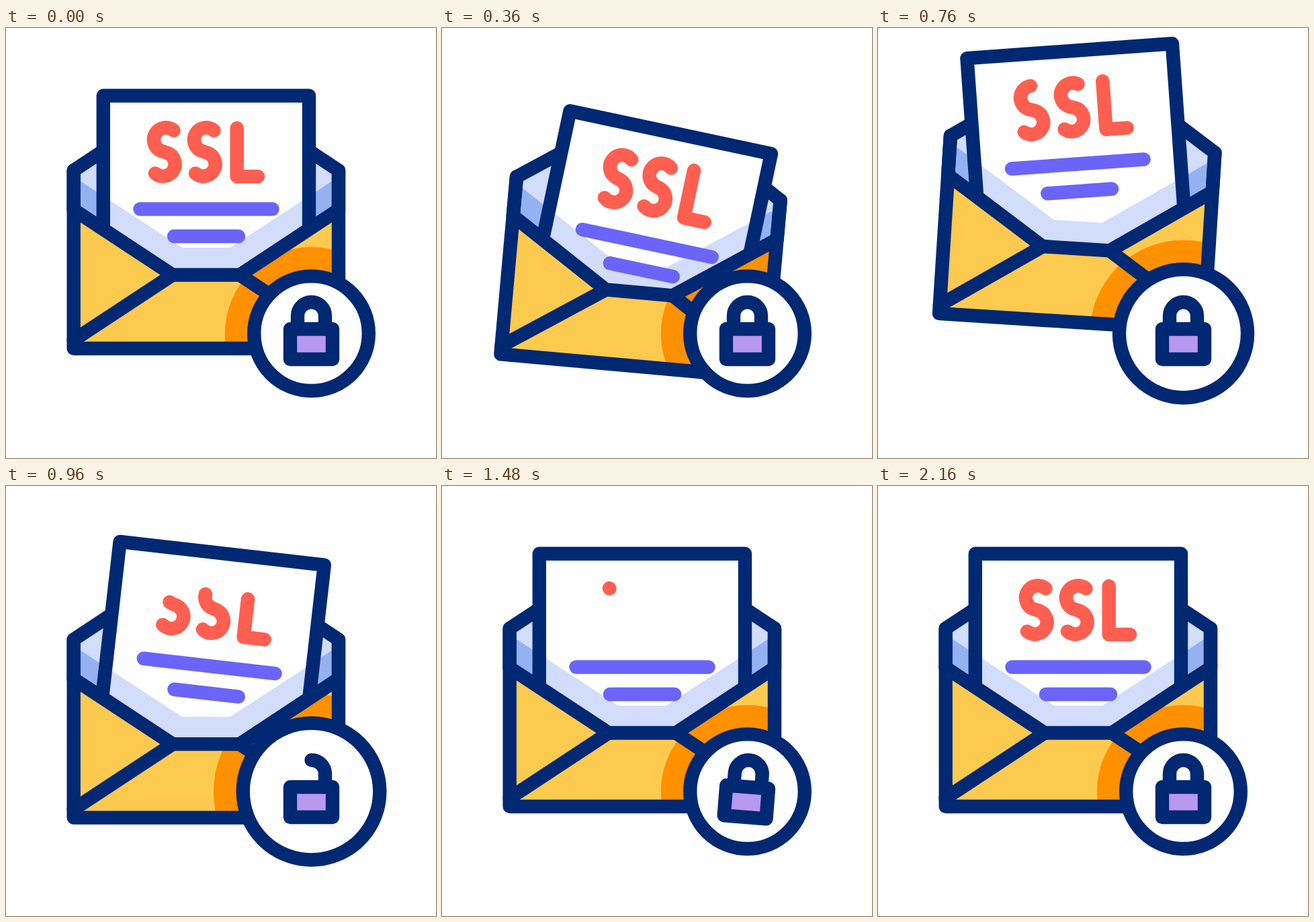
Recreate the animation shown at these times as an HTML page without scripts. Size 640 px wide and 640 px high, loop 2200 ms.

```html
<!DOCTYPE html>
<html lang="en">
<head>
<meta charset="utf-8">
<title>Secure mail</title>
<style>
  html, body { margin: 0; width: 100%; height: 100%; overflow: hidden; background: #fff; }
  svg { display: block; width: 100vw; height: 100vh; }

  :root { --sine: cubic-bezier(.37, 0, .63, 1); }
  svg * { transform-box: view-box; }

  .line { fill: none; stroke: #002873; stroke-width: 20.4; stroke-linecap: round; stroke-linejoin: round; }
  .bar { stroke: #6a65f8; stroke-width: 20.5; stroke-linecap: round; }
  .glyph {
    fill: none; stroke: #ff5f50; stroke-width: 20.5;
    stroke-linecap: round; stroke-linejoin: round; stroke-dasharray: 100 200;
  }

  .env, .letter, .lock, .badge, .glow, .glyph, .shackle {
    animation: 2200ms var(--sine) infinite;
  }
  .env { transform-origin: 298px 319px; animation-name: env-y, env-turn; }
  .letter { transform-origin: 298px 311px; animation-name: letter-y, letter-turn; }
  .lock { transform-origin: 454.5px 450px; animation-name: shake; }
  .badge { animation-name: badge; }
  .glow { animation-name: glow; }
  .shackle { stroke-dasharray: 100 200; animation-name: unlock; }
  .s1 { animation-name: write-s1; }
  .s2 { animation-name: write-s2; }
  .l { animation-name: write-l; }

  @keyframes env-y {
    0%, 66.36%, 100% { translate: 0 0; }
    18.18% { translate: 0 27.2px; }
    32.73% { translate: 0 -43px; }
    44.09% { translate: 0 16.8px; }
    53.64% { translate: 0 -26px; }
  }
  @keyframes env-turn {
    0% { rotate: 0deg; animation-timing-function: cubic-bezier(.42, 0, .85, .85); }
    20.91% { rotate: 7.3deg; }
    25.45% { rotate: 5.4deg; animation-timing-function: linear; }
    34.55% { rotate: 3.65deg; }
    43.64% { rotate: 0deg; }
    51.82% { rotate: 1.8deg; }
    62.73%, 100% { rotate: 0deg; }
  }
  /* the letter moves inside the envelope */
  @keyframes letter-y {
    0%, 66.36%, 100% { translate: 0 0; }
    16.36% { translate: 0 23.5px; }
    32.73%, 39.09% { translate: 0 -28px; }
    53.64% { translate: 0 14.5px; }
  }
  @keyframes letter-turn {
    0%, 58.18%, 100% { rotate: 0deg; }
    16.36% { rotate: 6.9deg; }
    32.73%, 34.55% { rotate: -7.75deg; }
    43.64% { rotate: 6.5deg; }
  }
  @keyframes badge {
    0%, 27.27%, 60.91%, 100% { r: 85.3px; }
    40%, 50.91% { r: 101.8px; }
  }
  @keyframes glow {
    0%, 27.27%, 60.91%, 100% { r: 128.7px; }
    40%, 50.91% { r: 145.6px; }
  }
  @keyframes unlock {
    0%, 35.45%, 55.45%, 100% { stroke-dashoffset: 0; }
    42.73%, 49.09% { stroke-dashoffset: -50; }
  }
  @keyframes shake {
    0%, 53.64%, 98.18%, 100% { rotate: 0deg; }
    58.64% { rotate: -6.6deg; }
    66.14% { rotate: 5deg; }
    74.09% { rotate: -3.2deg; }
    81.82% { rotate: 2deg; }
    90% { rotate: -1deg; }
  }
  /* erase from the start of the stroke, then draw it again */
  @keyframes write-s1 {
    0%, 27.27% { stroke-dashoffset: 0; animation-timing-function: ease-in; }
    54.55% { stroke-dashoffset: -102; }
    54.56%, 65.27% { stroke-dashoffset: 102; }
    85.27%, 100% { stroke-dashoffset: 0; }
  }
  @keyframes write-s2 {
    0%, 31.36% { stroke-dashoffset: 0; animation-timing-function: ease-in; }
    57.73% { stroke-dashoffset: -102; }
    57.74%, 67.05% { stroke-dashoffset: 102; }
    87.05%, 100% { stroke-dashoffset: 0; }
  }
  @keyframes write-l {
    0%, 35.45% { stroke-dashoffset: 0; animation-timing-function: ease-in; }
    61.36% { stroke-dashoffset: -102; }
    61.37%, 68.82% { stroke-dashoffset: 102; }
    88.82%, 100% { stroke-dashoffset: 0; }
  }
</style>
</head>
<body>
<svg viewBox="0 0 640 640" role="img" aria-label="SSL letter in an envelope with a padlock">
  <defs>
    <clipPath id="paper"><path class="letter" d="M145 415V101H451V415Z"/></clipPath>
    <clipPath id="front"><path class="env" d="M100.7 270.5L248 367.5H348L495 270.5V477H100.7Z"/></clipPath>
    <path id="shade" d="M101 221.5L262 327H334L495 221.5V270L348 367H248L101 270Z"/>
  </defs>

  <g class="env">
    <!-- back of the envelope -->
    <path fill="#d2dcfb" d="M101 212L190 153H406L495 212V270L348 367H248L101 270Z"/>
    <use href="#shade" fill="#94b2f2"/>
    <path class="line" d="M100.7 270V212L190 153H406L495 212V270"/>

    <!-- letter -->
    <path class="letter" fill="#fff" d="M145 415V101H451V415Z"/>
    <g clip-path="url(#paper)"><use href="#shade" fill="#d2dcfb"/></g>
    <g class="letter">
      <path class="line" d="M144.8 415V100.8H451V415"/>
      <path class="bar" d="M199.5 269.5H396.5"/>
      <path class="bar" d="M250 310H346"/>
      <path class="glyph s1" pathLength="100" d="M249.5 152.6A18 18 0 1 0 231 183L240.5 186A18 18 0 1 1 222 216.4"/>
      <path class="glyph s2" pathLength="100" d="M309.5 152.6A18 18 0 1 0 291 183L300.5 186A18 18 0 1 1 282 216.4"/>
      <path class="glyph l" pathLength="100" d="M343.7 149V221H375"/>
    </g>

    <path fill="#fdca50" d="M100.7 270.5L248 367.5H348L495 270.5V477H100.7Z"/>
  </g>

  <!-- the glow stays with the badge, seen only on the front -->
  <g clip-path="url(#front)">
    <circle class="glow" cx="454.5" cy="454.7" r="128.7" fill="#ff9000"/>
  </g>
  <g class="env">
    <path class="line" d="M100.7 212V477H495V212"/>
    <path class="line" d="M100.7 270.5L248 367.5H348L495 270.5"/>
    <path class="line" d="M248 367.5L100.7 464.5M348 367.5L495 464.5"/>
  </g>

  <!-- padlock badge -->
  <circle class="badge" cx="454.5" cy="454.7" r="85.3" fill="#fff" stroke="#002873" stroke-width="20.4"/>
  <g class="lock">
    <path class="line shackle" pathLength="100" d="M434 448V428.5a20.5 20.5 0 0 1 41 0V448"/>
    <path class="line" style="fill:#b998f0" d="M423 448H486V493H423Z"/>
  </g>
</svg>
</body>
</html>
```
